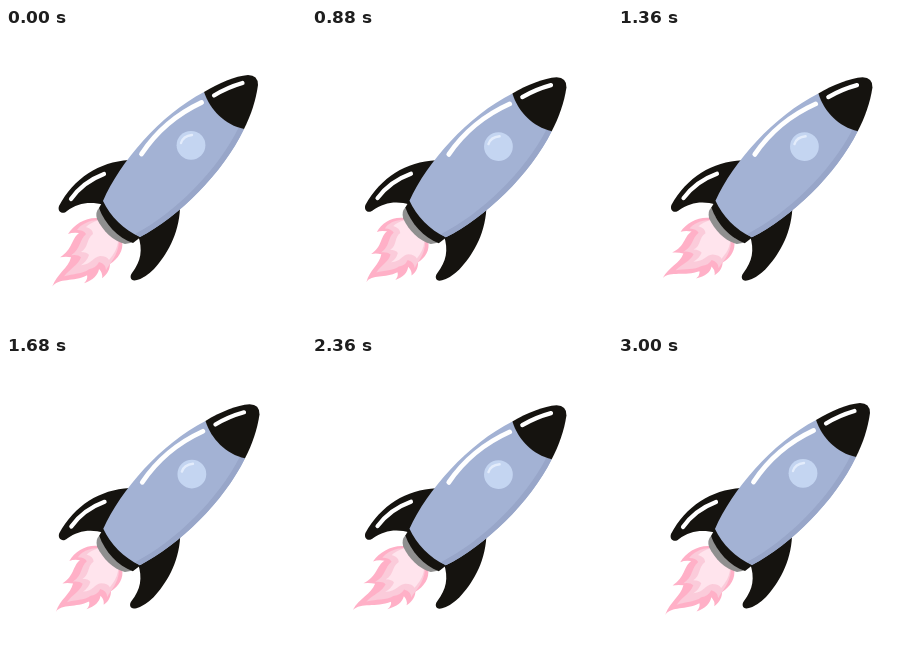
An HTML page for the animation above (3040 ms loop, 300 by 300 pixels).

```html
<!DOCTYPE html>
<html lang="en">
<head>
<meta charset="utf-8">
<title>Rocket</title>
<style>
  html, body { margin: 0; width: 100%; height: 100%; overflow: hidden; background: #fff; }
  svg { display: block; width: 100%; height: 100%; }
</style>
</head>
<body>
<svg viewBox="0 0 300 300">
  <g id="flame">
    <path fill="#ffb0c7" d="M92 190 C80 189 68 196 62 206 Q67 204 73 205 C65 211 67 221 54 229 Q60 228 65 229 C62 240 51 245 46 258 C53 249 67 254 81 247 Q82 251 78 255 C87 252 92 247 93 241 Q97 245 96 250 C102 246 104 240 104 236 C112 231 118 222 116 213 Z"/>
    <path fill="#fbcbda" d="M93 192 C83 192 74 197 71 202 Q78 202 80 206 C73 212 75 221 65 227 Q72 226 75 229 C72 237 64 240 58 248 C67 245 76 246 83 241 Q90 240 93 234 Q100 236 100 242 C103 236 112 228 113 214 Z"/>
    <path fill="#ffe4ed" d="M93 192 Q84 195 80 199 Q87 201 87 206 C80 211 83 219 75 224 Q81 224 83 227 Q81 233 75 237 C86 236 87 229 94 228 Q101 228 103 232 C108 226 111 221 112 214 Z"/>
  </g>
  <g id="rocket">
    <path fill="#8f8f8f" d="M93 180 Q89 184 91 191 C97 203 107 213 119 216 Q124 216 128 213 Z"/>
    <g fill="#15130f">
      <path d="M123 132 C93 134 68 150 53 178 C51 184 57 187 61 183 C72 175 84 173 98 177 Z"/>
      <path d="M174 180 C173 207 160 228 148 241 Q139 250 131 252 C125 254 123 249 126 245 C135 233 137 222 132 207 Z"/>
      <path d="M98 171 L93 180 C99 196 112 210 127 215 L136 208 Z"/>
    </g>
    <path fill="#a3b2d4" d="M97 173 C114 134 154 87 198 64 C206 82 220 96 238 101 C217 145 173 188.500 134 209 C118 202 104 188 97 173 Z"/>
    <path fill="#98a6c9" d="M238 101 C217 145 173 188.500 134 209 L129 206 C169 185 212 142 233 99 Z"/>
    <path fill="#15130f" d="M198 64 C213 55 229 48 242 47 Q252 47 252 57 C250 72 245 87 238 101 C219 97 204 82 198 64 Z"/>
    <circle cx="185" cy="117.3" r="14.4" fill="#c4d5f1"/>
    <g fill="none" stroke="#fff" stroke-linecap="round">
      <path stroke="#e3ecfb" stroke-width="2.4" d="M175 115 Q177 108 186 107"/>
      <path stroke-width="4.2" d="M65 171 Q77 154 98 146"/>
      <path stroke-width="4.8" d="M135.500 126 C150 104 171 86 195.500 74.500"/>
      <path stroke-width="4.2" d="M208 67.500 Q221 59.500 236.500 55"/>
    </g>
  </g>
</svg>
<script>
  const LOOP = 3040, STEP = 40;
  const ROOT = { x: 105, y: 202 }, REACH = 81, DIAG = Math.SQRT1_2;
  const rocket = document.getElementById('rocket');
  const layers = [...document.querySelectorAll('#flame path')]
    .map(el => ({ el, shape: el.getAttribute('d') }));

  // A cosine with a whole number of cycles per loop, peaking at the given phase.
  const wave = (t, cycles, peak) => Math.cos(2 * Math.PI * (t * cycles - peak));

  // Stretch along the flame's axis and bend sideways, more towards the tip.
  function warp(shape, stretch, bend) {
    return shape.replace(/([\d.]+) ([\d.]+)/g, (_, px, py) => {
      const dx = px - ROOT.x, dy = py - ROOT.y;
      const along = (dy - dx) * DIAG;
      const u = Math.max(0, along / REACH);
      const a = along + stretch * u;
      const side = (dx + dy) * DIAG + bend * u * u;
      const x = ROOT.x + (side - a) * DIAG;
      const y = ROOT.y + (side + a) * DIAG;
      return x.toFixed(2) + ' ' + y.toFixed(2);
    });
  }

  function draw(ms) {
    const t = Math.floor((ms % LOOP) / STEP) * STEP / LOOP;

    // The rocket snaps between two leaning poses.
    const lean = Math.max(-1, Math.min(1, 2.5 * wave(t, 12, 0.395)));
    rocket.setAttribute('transform', `rotate(${0.5 * (1 + lean)} 115 200)`);

    const stretch = -3.5 + 2.5 * wave(t, 5, 0.04) + 3 * wave(t, 1, 0.816);
    const bend = -1.5 + 5 * wave(t, 3, 0.816);
    for (const { el, shape } of layers) el.setAttribute('d', warp(shape, stretch, bend));
  }

  const start = performance.now();
  function tick() {
    draw(performance.now() - start);
    requestAnimationFrame(tick);
  }
  tick();
</script>
</body>
</html>
```
